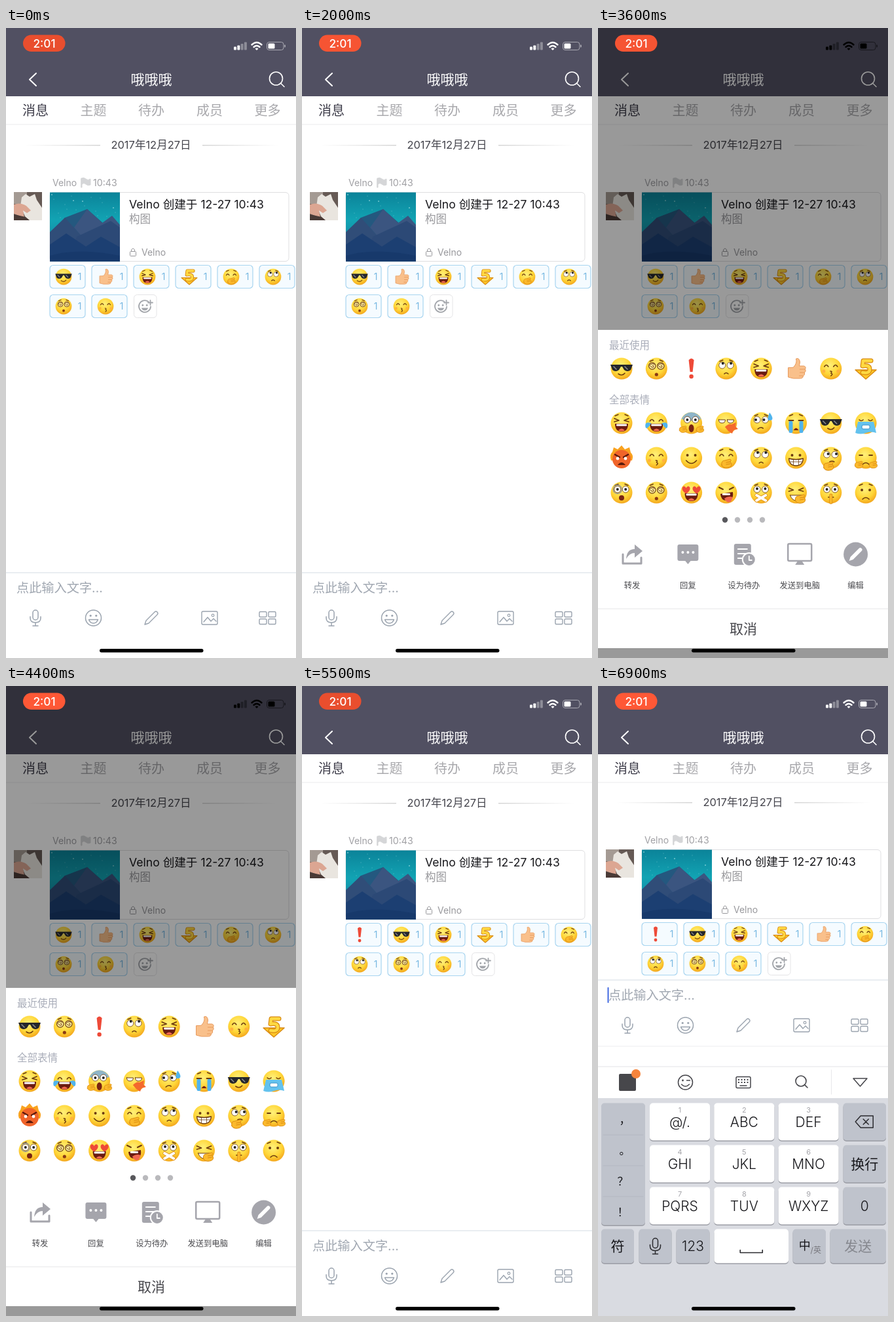
These frames come from a looping animation (443 px wide and 960 px high, 7 s). An HTML page:

```html
<!DOCTYPE html>
<html lang="zh">
<head>
<meta charset="utf-8">
<style>
html, body { margin: 0; width: 100%; height: 100%; overflow: hidden; background: #fff; }
svg { display: block; width: 100%; height: 100%; font-family: Inter, "Noto Sans CJK SC", "Noto Sans CJK", sans-serif; }
path { stroke-linecap: round; stroke-linejoin: round; }
</style>
</head>
<body>
<svg id="stage" viewBox="0 0 443 960"></svg>
<script>
const shape = (d, fill = 'none', stroke = 'none', w = 1.5) =>
  `<path d="${d}" fill="${fill}" stroke="${stroke}" stroke-width="${w}"/>`;
const line = (d, color, w) => shape(d, 'none', color, w);
const disc = (x, y, r, fill = 'none', stroke = 'none', w = 1) =>
  `<circle cx="${x}" cy="${y}" r="${r}" fill="${fill}" stroke="${stroke}" stroke-width="${w}"/>`;
const box = (x, y, w, h, r, fill = 'none', stroke = 'none', sw = 1) =>
  `<rect x="${x}" y="${y}" width="${w}" height="${h}" rx="${r}" fill="${fill}" stroke="${stroke}" stroke-width="${sw}"/>`;
// y is the vertical middle of the glyphs
const text = (x, y, size, str, fill, anchor = 'middle', weight = 400) =>
  `<text x="${x}" y="${y + size * .37}" font-size="${size}" fill="${fill}" text-anchor="${anchor}" font-weight="${weight}">${str}</text>`;
const at = (x, y, body, scale = 1) => `<g transform="translate(${x} ${y}) scale(${scale})">${body}</g>`;
const group = (id, body) => `<g id="${id}">${body}</g>`;
const each = (list, fn) => list.map(fn).join('');
const both = fn => fn(-1) + fn(1);

// Emoji, drawn around 0,0 with a radius of 16
const ink = '#6b3a10', blue = '#4fb4ee', red = '#ee4a38', gold = '#fbb92c', edge = '#d98a12';
const face = disc(0, 0, 16.5, 'url(#skin)');
const arcs = line('M-10-3q3-5 6 0M4-3q3-5 6 0', ink, 1.6);
const dots = both(s => disc(s * 6, -4, 2, ink));
const brows = line('M-10-11l5-2M10-11l-5-2', ink, 1.4);
const squint = line('M-11-7l7 3-7 2M11-7l-7 3 7 2', ink, 1.8);
const smirk = line('M-5 8q6 4 10-1', ink, 1.6);
const frown = line('M-5 10q5-5 10 0', ink, 1.6);
const grinOpen = shape('M-10 1H10Q10 13 0 13T-10 1Z', '#6a1b10') + box(-8, 1.5, 16, 3, 1, '#fff') +
  shape('M-5 11q5-5 10 0Q0 14-5 11Z', '#f0674f');
const looking = (dx, dy) => both(s => disc(s * 6.2, -5, 5, '#fff', ink, .8) + disc(s * 6.2 + dx, -5 + dy, 2, '#222'));
const palm = (x, y, s = 1) => at(x, y, shape('M-7 3Q-8-4-2-4L6-6Q9-5 6-2L8 1Q9 6 2 7T-7 3Z', gold, edge, 1) +
  line('M0-1L6-2M0 2l6-1', edge, 1), s);
const flames = color => shape('M-16 4Q-19-5-14-9L-12-16-6-13 0-19 5-13 12-16 14-8Q19-4 16 4Z', color);
const spiral = x => disc(x, -4, 5.2, '#fff0a0', ink, 1.2) + line(`M${x}-4q2-2 2 1t-4 0 1-4 4 1`, ink, 1);

const emoji = {
  cool: face + shape('M-17-6H17L14 2Q9 6 4 2L1-3H-1L-4 2Q-9 6-14 2Z', '#25262b') +
    line('M-12-3l4 4M5-3l4 4', '#8a8d96', 1.5) + smirk,
  dizzy: face + brows + spiral(-6.5) + spiral(6.5) + disc(0, 9, 2.6, '#8a3a14'),
  bang: shape('M-4-13Q0-18 4-13L2 5H-2Z', red) + disc(0, 12, 3.2, red),
  lookUp: face + brows + looking(1, -3) + line('M-3 8q3-3 6 0', ink, 1.6),
  laugh: face + brows + squint + grinOpen,
  thumb: shape('M-4-2Q2-8 0-15 5-17 6-10L5-4H12Q16-3 14 1 16 4 13 6 14 10 11 11 11 15 6 15H-4L-12 13V-1Z', '#f9c08b', '#e79a5e', 1) +
    line('M6 1h7M6 6h6M5 11h5', '#e79a5e', 1.2),
  kiss: face + arcs + line('M-1 4q4 0 1 3 4 1 0 4', ink, 1.5) + both(s => disc(s * 11, 4, 2.5, '#ffb23e')),
  five: shape('M-16 2H16L0 16Z', '#ffc828', edge) + line('M8-12H-4L-5-4Q6-6 6 1T-5 6', edge, 7) +
    line('M8-12H-4L-5-4Q6-6 6 1T-5 6', '#ffd942', 4.5),
  joy: face + arcs + grinOpen + both(s => shape(`M${s * 8} 0Q${s * 18}-3 ${s * 17} 5T${s * 8} 0Z`, blue)),
  scream: face + shape('M-15-6A16 16 0 0 1 15-6Q0-1-15-6Z', '#8fb5c8') + looking(0, 0) +
    `<ellipse cy="8" rx="4" ry="6" fill="#7a2412"/>` + both(s => palm(s * 13, 9, .75)),
  spit: face + both(s => shape(`M${s * 6.5 - 5}-5h10q0 5-5 5t-5-5Z`, '#fff', ink, 1)) +
    shape('M-2 6Q4 0 8 2L15-1 14 5 18 9 11 11 9 16 3 12Z', '#f4692d'),
  sweat: face + brows + looking(-2, 0) + line('M-5 9q4-4 8-1', ink, 1.6) + shape('M13-16Q21-5 14-4T13-16Z', blue),
  cry: face + brows + line('M-11-4h7M4-4h7', ink, 1.8) +
    both(s => box(s * 8 - 3, -3, 6, 18, 2, blue)) + shape('M-4 11q4-7 8 0Z', '#7a2412'),
  flood: face + line('M-10-5q3 3 6 0M4-5q3 3 6 0', ink, 1.6) + shape('M-12-2H12L16 15Q8 12 0 15T-16 15Z', '#63c2ee') +
    box(-6, 3, 12, 6, 2, '#fff', '#3b93c9'),
  rage: flames('#f9a21f') + disc(0, 2, 14, '#f0642a') + line('M-10-5l7 4M10-5l-7 4', '#5a1a0c', 2.4) +
    both(s => disc(s * 6, 1, 2.4, '#fff')) + shape('M-6 11q6-8 12 0Z', '#5a1a0c'),
  smile: face + dots + line('M-8 4q8 9 16 0', ink, 1.6),
  giggle: face + brows + arcs + palm(0, 8),
  grin: face + dots + shape('M-11 1Q0 4 11 1 10 12 0 12T-11 1Z', '#fff', ink, 1.3) + line('M-10 6H10M-4 3V11M4 3V11', ink, .8),
  think: face + brows + looking(2, -1) + line('M-2 6q4-2 7 0', ink, 1.6) + palm(-4, 12),
  hug: face + line('M-10-4h5M5-4h5', ink, 1.8) + frown + both(s => palm(s * 11, 10, .8)),
  shock: face + brows + looking(0, 0) + disc(-6.2, -5, 6.5, 'none', '#8a8d96', 1.3) + disc(0, 8, 4, '#7a2412'),
  love: face + both(s => at(s * 8, -4, shape('M0 6Q-9-1-5-5-2-7 0-3 2-7 5-5 9-1 0 6Z', red))) + grinOpen,
  shout: face + line('M-11-8l6 3M11-8l-6 3', ink, 2) + shape('M-9 2L10-1Q12 11 2 12T-9 2Z', '#6a1b10') +
    shape('M-3 9Q3 4 10 7L7 14Q1 17-3 9Z', '#f0674f') + box(-6, 1, 12, 3, 1, '#fff'),
  taped: face + brows + looking(0, -1) + line('M-7 4L7 12M7 4L-7 12', edge, 5.5) + line('M-7 4L7 12M7 4L-7 12', '#fff', 4),
  snicker: face + squint + shape('M-9 4H9Q6 12 0 12T-9 4Z', '#fff', ink, 1) + palm(6, 9),
  shush: face + brows + looking(0, 0) + line('M-4 7h8', ink, 1.6) + line('M0 4V15', edge, 5) + line('M0 4V15', gold, 3.5),
  sad: face + brows + dots + frown
};
const use = (name, x, y, s = 1) => `<use href="#${name}" transform="translate(${x} ${y}) scale(${s})"/>`;

const chipAt = i => [67 + 64 * (i % 6), 361.5 + 45 * Math.floor(i / 6)];
function reactions(id, names) {
  const chips = each(names, (name, i) => {
    const [x, y] = chipAt(i);
    return box(x, y, 54, 35, 5, '#f5fbff', '#a8d5f0', 1.2) + use(name, x + 21, y + 17.5, .75) +
      text(x + 45.5, y + 17.5, 14, '1', '#78b9e2');
  });
  const [x, y] = chipAt(names.length);
  const add = line('M5.5-7.5A9 9 0 1 0 9 0M5-6h7M8.5-9.5v7', '#a3a6ab', 1.8) +
    both(s => disc(s * 3.2, -2, 1.4, '#a3a6ab')) + shape('M-5 2H5Q4 6 0 6T-5 2Z', '#a3a6ab');
  return group(id, chips + box(x + .5, y, 34.5, 35, 5, '#fff', '#e4e4e6') + at(x + 17, y + 18, add));
}

const user = 'Velno', grey = '#9aa3ae', tabX = [45, 133.5, 222, 311, 399.5];
const mic = color => box(-4, -12, 8, 15, 4, 'none', color, 1.5) + line('M-8-2V0Q-8 7 0 7T8 0V-2M0 7v5M-4 12h8', color, 1.5);
const pencil = 'M-10 10l2-6L5-9q2-2 4 0t0 4L-4 8Z';
const magnifier = (x, y, r, color) => disc(x, y, r, 'none', color, 1.6) +
  line(`M${x + r * .7} ${y + r * .7}l${r * .55} ${r * .55}`, color, 1.6);

const header = box(0, 0, 443, 104, 0, '#515062') + line('M46 69L36 78.5 46 88', '#fff', 2) +
  text(222, 78, 21, '哦哦哦', '#fff') + magnifier(412.5, 77, 10, '#fff') +
  box(0, 104, 443, 43, 0, '#fff') + line('M0 147H443', '#ebebed', 1) +
  each(['消息', '主题', '待办', '成员', '更多'], (s, i) =>
    text(tabX[i], 126, 20, s, i ? '#a8a8ac' : '#3d3c49', 'middle', i ? 400 : 500));

const statusIcons = each([5, 7, 9.5, 12], (h, i) =>
    `<g opacity="${i < 2 ? 1 : .35}">${box(348 + 5.3 * i, 33.5 - h, 4, h, 1, 'currentColor')}</g>`) +
  line('M375.5 25.5q7.5-7 15 0M378.5 29q4.5-4 9 0', 'currentColor', 2.4) + shape('M380.5 31.5q2.5-2 5 0L383 34Z', 'currentColor') +
  `<g opacity=".5">${box(398.5, 21.5, 25.5, 12, 3.5, 'none', 'currentColor')}${box(425.3, 25.5, 1.7, 4, .8, 'currentColor')}</g>` +
  box(400.5, 23.5, 10, 8, 1.5, 'currentColor');

const avatar = `<svg x="12" y="250" width="43" height="43">` + box(0, 0, 43, 43, 0, '#665a55') +
  box(0, 0, 20, 18, 0, '#a49a93') + shape('M12 8L18 3 24 7 32 3 35 12 43 24V43H20L10 22Z', '#e9e5df') +
  shape('M0 19Q10 15 19 21L26 28 20 32 14 28 16 39 0 33Z', '#dca692') + shape('M0 34L18 38 24 43H0Z', '#4a3a36') + `</svg>`;
const cover = box(67, 250.5, 107, 105, 0, 'url(#sky)') +
  each([...Array(22).keys()], i => disc(70 + i * 37 % 101, 254 + i * 23 % 41, i % 4 ? .4 : .8, '#bdeef0')) +
  shape('M67 316L90 289 124 276 174 320V355.5H67Z', '#24587f') + shape('M124 276L104 304 116 318 174 330V300L162 286 147 297Z', '#3b5580') +
  shape('M67 311L90 289 136 340 67 345Z', '#304d78') + shape('M108 318L160 294 174 304V345H100Z', '#2c4976') +
  shape('M67 330L92 313 122 333 145 318 174 334V355.5H67Z', '#1c3f72') + shape('M67 347Q110 334 174 347V355.5H67Z', '#17396b');

const chat = `<path d="M28 178.5H144V179.3H28Z" fill="url(#fadeL)"/><path d="M300 178.5H416V179.3H300Z" fill="url(#fadeR)"/>` +
  text(221.5, 178, 16.5, '2017年12月27日', '#45454d') +
  text(71, 236, 14, user, '#a0a0a4', 'start') + text(133, 236, 14.2, '10:43', '#a0a0a4', 'start') +
  shape('M115 229q4-2 7 1t7 0v9q-4 2-7-1t-6 0v5h-1Z', '#d5d6d8', '#d5d6d8', 1) + avatar +
  box(67, 250.5, 365, 105, 5, '#fff', '#dedee0') + cover +
  text(188, 268, 17.6, user + ' 创建于 12-27 10:43', '#17171b', 'start') + text(188, 291, 16.5, '构图', '#98989c', 'start') +
  box(189.5, 340.5, 9, 7, 1, 'none', '#98989c') + line('M191.5 340v-2q2.500-4 5 0v2', '#98989c', 1) + text(207, 342, 14, user, '#98989c', 'start') +
  reactions('before', ['cool', 'thumb', 'laugh', 'five', 'giggle', 'lookUp', 'dizzy', 'kiss']) +
  reactions('after', ['bang', 'cool', 'laugh', 'five', 'thumb', 'giggle', 'lookUp', 'dizzy', 'kiss']);

const inputBar = box(0, 830, 443, 132, 0, '#fff') + line('M0 830H443', '#d4dce3', 1.2) +
  text(16, 853, 19.2, '点此输入文字...', '#a0a7b1', 'start') +
  at(45, 899, mic(grey)) +
  at(133.5, 899, disc(0, 0, 12, 'none', grey, 1.5) + both(s => disc(s * 4.3, -3.5, 1.6, grey)) + line('M-7 2.500Q-5 8 0 8T7 2.500Z', grey, 1.4)) +
  at(222, 899, line(pencil, grey, 1.4)) +
  at(311, 899, box(-12, -10, 24, 20, 2, 'none', grey, 1.4) + line('M-9 6L-3-1 2 5 6 1 10 5', grey, 1.4) + disc(5, -4, 1.8, 'none', grey, 1.2)) +
  at(399.5, 899, both(a => both(b => box(a * 7 - 5.5, b * 5.5 - 4, 11, 8, 1.5, 'none', grey, 1.4)))) +
  group('cursor', line('M0 931H443', '#ededf0', 1) + line('M15.5 842V864', '#4169e1', 2));

const emojiRow = (y, names) => each(names.split(' '), (n, i) => use(n, 36 + 53.3 * i, y));
const tint = '#a5a5ac';
const actions = [
  ['转发', line('M-14 0V14H14V5', tint, 3) + shape('M-9 7Q-8-8 4-8V-15L16-5 4 5V-2Q-4-2-9 7Z', tint)],
  ['回复', box(-16, -15, 32, 25, 3, tint) + shape('M-5 9H5L0 15Z', tint) + each([-8, 0, 8], x => disc(x, -3, 2, '#fff'))],
  ['设为待办', box(-15, -16, 26, 32, 3, tint) + line('M-9-8H5M-9-1H3M-9 6H-3', '#fff', 2) +
    disc(8, 8, 10, tint, '#fff', 2) + line('M8 3V9H12', '#fff', 1.8)],
  ['发送到电脑', box(-18, -16, 36, 26, 2, 'none', tint, 2.5) + shape('M-3 10H3L7 16H-7Z', tint)],
  ['编辑', disc(0, 0, 18.5, tint) + shape(pencil, '#fff')]
];
const sheet = box(0, 460, 443, 485, 0, '#fff') +
  text(17, 483.5, 15.5, '最近使用', '#a9adb9', 'start') + emojiRow(519, 'cool dizzy bang lookUp laugh thumb kiss five') +
  text(17, 566, 15.5, '全部表情', '#a9adb9', 'start') + emojiRow(602, 'laugh joy scream spit sweat cry cool flood') +
  emojiRow(655, 'rage kiss smile giggle lookUp grin think hug') + emojiRow(708, 'shock dizzy love shout taped snicker shush sad') +
  each([0, 1, 2, 3], i => disc(194 + 19 * i, 749.5, 4.2, i ? '#b9b9bc' : '#58585c')) +
  each(actions, ([label, icon], i) => at(52 + 85.4 * i, 802, icon) + text(52 + 85.4 * i, 849, 12.3, label, '#4a4a4e')) +
  line('M0 885H443', '#e6e6e8', 1) + text(222, 915, 21, '取消', '#48484d');

const key = (x, y, w, h, fill, body = '') => box(x, y + 1.5, w, h, 5, '#9b9da5') + box(x, y, w, h, 5, fill) + at(x + w / 2, y + h / 2, body);
const label = (s, size = 21, color = '#17171b') => text(0, 0, size, s, color, 'middle', 300);
const pale = '#bfc3cc', dark = '#46464b';
const keyboard = box(0, 580, 443, 380, 0, '#d9dbe1') + box(0, 580, 443, 48, 0, '#fff') +
  line('M0 580H443', '#e3e3e6', 1) + line('M356.500 585V622', '#e8e8ea', 1) +
  box(32, 591, 26, 26, 2, '#47474b') + disc(58, 591, 7, '#f5843c') +
  at(133.5, 604, disc(0, 0, 11, 'none', dark, 1.5) + disc(-4, -3, 1.4, dark) + line('M2-3h5M-6 3q6 6 12 0', dark, 1.4)) +
  at(222, 604, box(-11, -8.500, 22, 17, 2, 'none', dark, 1.5) +
    each([-4, 0], y => each([-7, -2.500, 2, 6.500], x => box(x - 1, y - 1, 2, 2, 0, dark))) + line('M-5 5H5', dark, 1.5)) +
  magnifier(310, 602, 8, dark) + line('M390 598H411L400.500 610Z', dark, 1.5) +
  key(5, 635.5, 67, 186, pale) + each(['，', '。', '？', '！'], (s, i) =>
    text(i < 2 ? 41 : 38, 661 + 47 * i, 17, s, '#17171b') + (i ? line(`M8 ${637 + 47 * i}H69`, '#b3b7c1', 1) : '')) +
  each(['@/.', 'ABC', 'DEF', 'GHI', 'JKL', 'MNO', 'PQRS', 'TUV', 'WXYZ'], (s, i) =>
    key(79 + 98.3 * (i % 3), 635.5 + 64 * Math.floor(i / 3), 92, 57, '#fff', label(s) + text(0, -18.500, 11, i + 1, '#a5a5aa'))) +
  key(374.5, 635.5, 65.5, 57, pale, line('M-14 0L-6-9H13V9H-6ZM-2-4L6 4M6-4L-2 4', '#2b2b2f', 1.5)) +
  key(374.5, 699.5, 65.5, 57, pale, label('换行')) + key(374.5, 763.5, 65.5, 57, pale, label('0')) +
  key(5, 827.5, 50, 52, pale, label('符')) + key(62.5, 827.5, 50, 52, pale, mic('#2b2b2f')) +
  key(119.5, 827.5, 51, 52, pale, label('123')) + key(177.5, 827.5, 113.5, 52, '#fff', line('M-17 6V10H17V6', '#2b2b2f', 1.6)) +
  key(297.5, 827.5, 50.5, 52, pale, text(-7, -1, 18, '中', '#17171b') + text(10, 6, 12, '/英', '#77777d')) +
  key(354.5, 827.5, 85.5, 52, pale, label('发送', 21, '#85878e'));

const stops = list => each(list, ([o, c, a = 1]) => `<stop offset="${o}" stop-color="${c}" stop-opacity="${a}"/>`);
const $ = id => document.getElementById(id);
$('stage').innerHTML = `<defs>
  <radialGradient id="skin" cx=".45" cy=".35" r=".68">${stops([[0, '#fff07a'], [.6, '#ffd638'], [1, '#f2a21b']])}</radialGradient>
  <linearGradient id="sky" x2="0" y2="1">${stops([[0, '#0b8399'], [.4, '#12a3b3'], [1, '#14769a']])}</linearGradient>
  <linearGradient id="fadeL">${stops([[0, '#aaa', 0], [1, '#aaa']])}</linearGradient>
  <linearGradient id="fadeR">${stops([[0, '#aaa'], [1, '#aaa', 0]])}</linearGradient>
  ${each(Object.entries(emoji), ([id, body]) => group(id, body))}</defs>` +
  box(0, 0, 443, 960, 0, '#fff') + group('chat', chat) + header + group('bar', inputBar) + group('keyboard', keyboard) +
  group('shade', box(0, 0, 443, 960, 0, '#000')) + group('sheet', sheet) + group('status', statusIcons) +
  group('pill', box(26, 10.5, 64.5, 25.5, 12.7, 'currentColor')) + text(58.5, 23.2, 17.3, '2:01', '#fff', 'middle', 500) +
  box(143, 946, 158.5, 5.5, 2.75, '#000');

const progress = (t, start, length) => Math.min(1, Math.max(0, (t - start) / length));
const easeOut = q => 1 - (1 - q) ** 3;
const shift = (id, y) => $(id).setAttribute('transform', `translate(0 ${y})`);
const show = (id, on) => $(id).setAttribute('display', on ? 'inline' : 'none');

function draw() {
  const t = Math.floor(performance.now() % 7000 / 100) * 100;
  const opened = easeOut(progress(t, 3400, 200)) * (1 - progress(t, 4600, 200)) ** 1.4;
  const typing = easeOut(progress(t, 6500, 300));
  const glow = .5 - .5 * Math.cos(t / 1400 * Math.PI);

  shift('sheet', 500 * (1 - opened));
  $('shade').setAttribute('opacity', .4 * opened);
  $('status').setAttribute('color', opened > 0 ? '#000' : '#fff');
  $('pill').setAttribute('color', `rgb(${233 + 22 * glow} ${78 + 10 * glow} ${46 + 8 * glow})`);
  show('before', t < 5000);
  show('after', t >= 5000);
  shift('chat', -typing);
  shift('bar', -382 * typing);
  shift('keyboard', 380 * (1 - typing));
  show('keyboard', typing > 0);
  show('cursor', typing > 0);
  requestAnimationFrame(draw);
}
draw();
</script>
</body>
</html>
```
